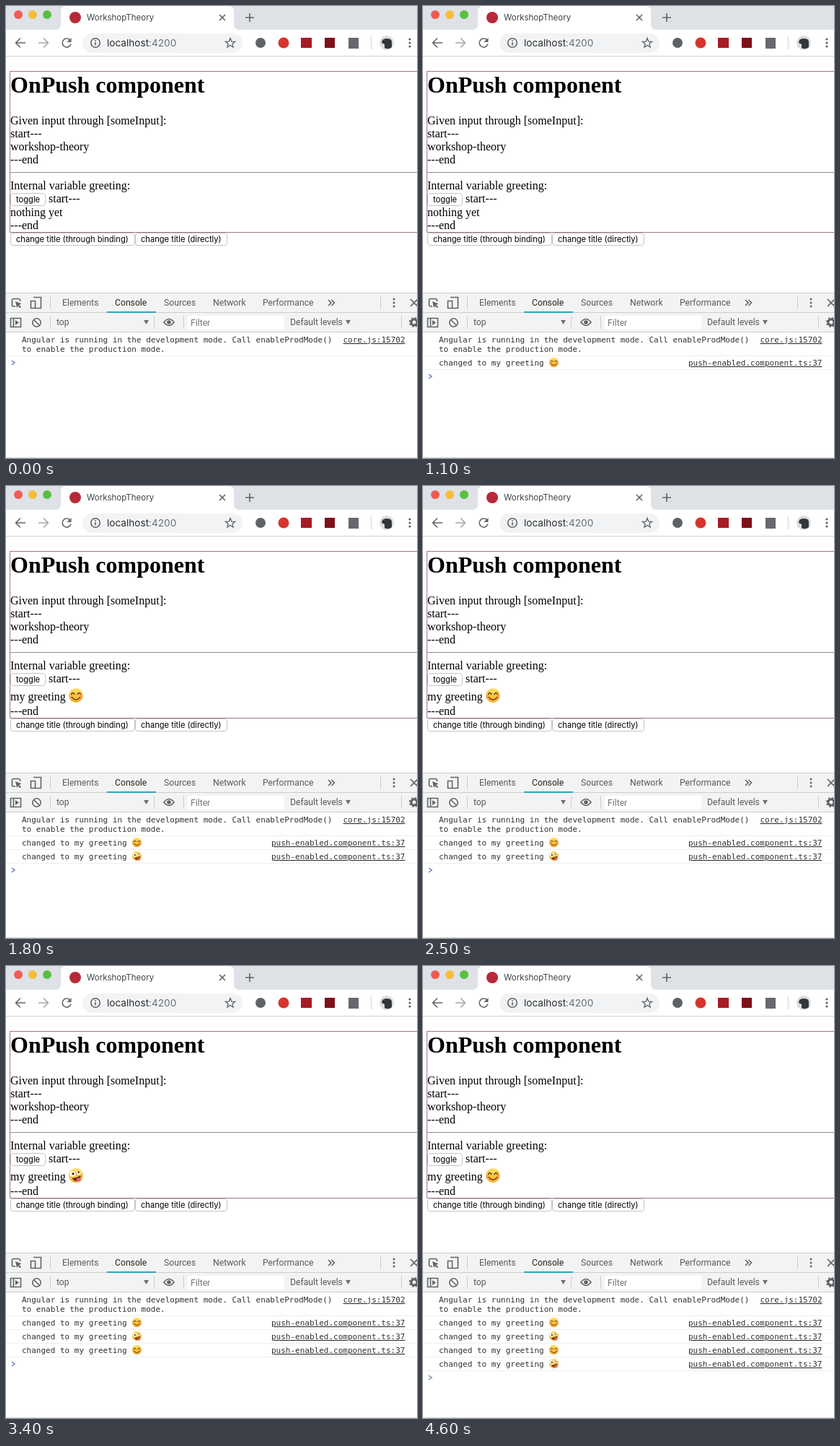
These frames come from a looping animation (570 px wide and 626 px high, 4800 ms). An HTML page:

```html
<!DOCTYPE html>
<html lang="en">
<head>
<meta charset="utf-8">
<title>OnPush component</title>
<style>
  html, body { margin: 0; width: 100%; height: 100%; overflow: hidden; background: #fff; }
  svg { display: block; width: 570px; height: 626px; }
  text { white-space: pre; }
  .page { font: 16px "Liberation Serif", serif; fill: #000; }
  .title { font: bold 32px "Liberation Serif", serif; }
  .chrome { font: 11.5px Inter, sans-serif; fill: #3c4043; }
  .url { font: 13.6px Inter, sans-serif; fill: #2b2d30; }
  .btn { font: 11.15px Inter, sans-serif; fill: #000; }
  .tool { font: 12.2px Roboto, sans-serif; fill: #5a5a5a; }
  .mono { font: 11px "DejaVu Sans Mono", monospace; fill: #303030; }
  .link { text-decoration: underline; }
  .line { fill: none; stroke: #5f6368; stroke-width: 1.6; }
  .rule { stroke: #ccc; }
</style>
</head>
<body>
<svg viewBox="0 0 570 626">
  <defs>
    <linearGradient id="pressed" x2="0" y2="1">
      <stop offset="0" stop-color="#6aa3f4"/><stop offset="1" stop-color="#2a62dc"/>
    </linearGradient>
    <linearGradient id="skin" x2="0" y2="1">
      <stop offset="0" stop-color="#ffe168"/><stop offset="1" stop-color="#f3ab2c"/>
    </linearGradient>
    <g id="smile">
      <circle r="10" fill="url(#skin)"/>
      <circle cx="-6.5" cy="2" r="2.4" fill="#f28a45" opacity=".6"/>
      <circle cx="6.5" cy="2" r="2.4" fill="#f28a45" opacity=".6"/>
      <path d="M-6.5-1.5q2.2-4 4.4 0M2.1-1.5q2.2-4 4.4 0M-5.5 3q5.500 6 11 0" fill="none" stroke="#6b3d12" stroke-width="1.5" stroke-linecap="round"/>
    </g>
    <g id="zany" transform="rotate(-12)">
      <circle r="10" fill="url(#skin)"/>
      <circle cx="-4" cy="-3" r="3.700" fill="#fff"/><circle cx="-3.500" cy="-3" r="1.700" fill="#4b2d16"/>
      <circle cx="4.500" cy="-3" r="2.700" fill="#fff"/><circle cx="4.500" cy="-3.500" r="1.400" fill="#4b2d16"/>
      <path d="M-6 2.500Q0 4 6.500 1.500Q5 8.500 0 8Q-4.500 7.500-6 2.500Z" fill="#5b2d14"/>
      <path d="M-1 5.500Q3 2.500 5 5Q6.500 9 3 9.500Q0 9.500-1 5.500Z" fill="#ee5f74"/>
    </g>
  </defs>
  <rect width="570" height="626" fill="#fff"/>

  <!-- browser window -->
  <rect width="570" height="33" fill="#dee1e6"/>
  <path d="M68 33Q76 33 76 25V8Q76 0 84 0H308Q316 0 316 8V25Q316 33 324 33Z" fill="#fff"/>
  <circle cx="17" cy="12" r="6" fill="#ee5c54"/>
  <circle cx="37" cy="12" r="6" fill="#f6bd3b"/>
  <circle cx="57" cy="12" r="6" fill="#58c041"/>
  <circle cx="96" cy="16" r="8" fill="#b52a38"/>
  <text class="chrome" x="112" y="20">WorkshopTheory</text>
  <g class="line">
    <path d="M296 12l8 8m0-8l-8 8M332 16h12m-6-6v12"/>
    <path d="M27 51H14m6-6.500l-6.500 6.500 6.500 6.500"/>
    <path d="M45 51H58m-6-6.500l6.500 6.500-6.500 6.500" stroke="#a5a8ac"/>
    <path d="M89 47.500A6 6 0 1 0 90 52.500"/>
  </g>
  <path d="M90.500 44v6h-6z" fill="#5f6368"/>
  <rect x="106" y="38" width="222" height="27" rx="13.500" fill="#f1f3f4"/>
  <g class="line" stroke-width="1.400">
    <circle cx="124" cy="51" r="6.300"/>
    <path d="M124 50v4.500M124 47v1.700"/>
    <path id="star" stroke-width="1.300"/>
  </g>
  <text class="url" x="140" y="56">localhost<tspan fill="#6b6f74">:4200</tspan></text>
  <circle cx="353" cy="51" r="7" fill="#5f6368"/>
  <circle cx="385" cy="51" r="7.500" fill="#d8342f"/>
  <rect x="409" y="44" width="15" height="14" fill="#a51c24"/>
  <rect x="442" y="44" width="14" height="14" fill="#800f18"/>
  <rect x="475" y="44" width="14" height="15" fill="#65686c"/>
  <path d="M506.500 42v18" stroke="#d0d3d7"/>
  <circle cx="528" cy="51" r="10" fill="#d9dce0"/>
  <path d="M521 51Q521 45 528 45Q536 45 535 51L535 57Q530 61 525 58V53Z" fill="#34373a"/>
  <g fill="#5f6368">
    <circle cx="560" cy="46" r="1.600"/><circle cx="560" cy="51" r="1.600"/><circle cx="560" cy="56" r="1.600"/>
  </g>
  <path d="M0 69.500H570" stroke="#cfd1d4"/>

  <!-- page -->
  <g class="page">
    <text class="title" x="6" y="120">OnPush component</text>
    <text x="6" y="164">Given input through [someInput]:</text>
    <text x="6" y="182">start---</text>
    <text x="6" y="200">workshop-theory</text>
    <text x="6" y="218">---end</text>
    <path d="M6 230.500H570" stroke="#909090"/>
    <text x="6" y="254">Internal variable greeting:</text>
    <text x="59" y="272">start---</text>
    <text id="greeting" x="6"></text>
    <text id="end" x="6">---end</text>
  </g>
  <use id="face"/>
  <path id="frame" fill="none" stroke="#a3728a"/>
  <rect id="toggle" x="6.500" y="259.500" width="48" height="17" rx="3.500"/>
  <text class="btn" x="14" y="272">toggle</text>
  <g id="buttons">
    <g fill="#fff" stroke="#c4c4c4">
      <rect x="6.500" y="314.500" width="172" height="17" rx="3.500"/>
      <rect x="179.500" y="314.500" width="127" height="17" rx="3.500"/>
    </g>
    <text class="btn" x="14" y="327">change title (through binding)</text>
    <text class="btn" x="187" y="327">change title (directly)</text>
  </g>

  <!-- developer tools -->
  <rect y="397" width="570" height="55" fill="#f3f3f3"/>
  <path class="rule" d="M0 397.500H570M0 424.500H570M0 451.500H570M61.500 402v18M519.500 402v18M61.500 429v18M205.500 429v18M246.500 429v18M548.500 429v18"/>
  <path d="M140 424H208" stroke="#2fa5c0" stroke-width="2"/>
  <g class="tool">
    <text x="78" y="415">Elements</text>
    <text x="151" y="415" fill="#222">Console</text>
    <text x="219" y="415">Sources</text>
    <text x="287" y="415">Network</text>
    <text x="356" y="415">Performance</text>
    <text x="70" y="442">top</text>
    <rect x="252" y="429" width="134" height="19" fill="#fff"/>
    <text x="256" y="443" fill="#757575">Filter</text>
    <text x="394" y="442">Default levels</text>
    <path d="M191 435h7l-3.500 6zM471 435h7l-3.500 6z" fill="#6e6e6e"/>
  </g>
  <g class="line" stroke-width="1.400">
    <path d="M13 416H10.500Q8.500 416 8.500 414V407.500Q8.500 405.500 10.500 405.500H17.500Q19.500 405.500 19.500 407.500V409"/>
    <path d="M38 403.500H48.500V418.500H41M34.500 408.500H40.500V418.500H34.500Z"/>
    <path d="M447 407l4 4-4 4m4.500-8l4 4-4 4M561 406l10 10m0-10l-10 10"/>
    <path d="M6.500 432.500H20.500V444.500H6.500ZM10.500 432V445"/>
    <circle cx="42.500" cy="438.500" r="5.700"/><path d="M38.500 434.500l8 8"/>
    <path d="M219 438Q226 429 233 438Q226 447 219 438Z"/>
    <circle cx="566" cy="438" r="4" stroke-width="3"/>
    <circle cx="566" cy="438" r="6" stroke-width="2" stroke-dasharray="2.500 2.210"/>
  </g>
  <path d="M13 409l8.500 3.500-3.500 1.300 3 3-1.500 1.500-3-3-1.300 3.200zM13 435l5 3.500-5 3.500z" fill="#5f6368"/>
  <circle cx="226" cy="438" r="2.800" fill="#5f6368"/>
  <g fill="#5f6368">
    <circle cx="538" cy="406" r="1.500"/><circle cx="538" cy="411" r="1.500"/><circle cx="538" cy="416" r="1.500"/>
  </g>
  <g class="mono">
    <text x="22" y="466">Angular is running in the development mode. Call enableProdMode()</text>
    <text x="22" y="479">to enable the production mode.</text>
    <text class="link" x="467.500" y="466">core.js:15702</text>
    <path d="M0 484.500H570" stroke="#eee"/>
    <g id="log"></g>
  </g>
  <path id="prompt" d="M8 491l4 3-4 3" fill="none" stroke-width="1.500"/>
  <path d="M0 625.500H570" stroke="#d5d5d5"/>
</svg>
<script>
const LOOP = 4800;
const ROW = 19;
const FACES = ['smile', 'zany'];
// Each press of the toggle: [down, up] in ms; the release logs a line.
const CLICKS = [[500, 700], [1600, 1800], [2600, 2800], [3500, 3700]];
const el = id => document.getElementById(id);
const set = (id, attrs) => {
  for (const name in attrs) el(id).setAttribute(name, attrs[name]);
};
const faceAt = (x, y, scale) => `translate(${x} ${y}) scale(${scale})`;

const starPoints = Array.from({ length: 10 }, (_, i) => {
  const angle = -Math.PI / 2 + i * Math.PI / 5;
  const radius = i % 2 ? 3 : 7;
  return `${311 + radius * Math.cos(angle)} ${51.5 + radius * Math.sin(angle)}`;
});
set('star', { d: `M${starPoints.join('L')}Z` });

el('log').innerHTML = CLICKS.map((_, i) => `
  <g transform="translate(0 ${i * ROW})">
    <text x="22" y="498">changed to my greeting</text>
    <use href="#${FACES[i % 2]}" transform="${faceAt(181.5, 493.5, 0.67)}"/>
    <text class="link" x="368" y="498">push-enabled.component.ts:37</text>
    <path d="M0 503.5H570" stroke="#eee"/>
  </g>`).join('');

function draw(time) {
  const pressed = CLICKS.some(([down, up]) => time >= down && time < up);
  const count = CLICKS.filter(([, up]) => time >= up).length;
  // The view shows the value set by the previous click.
  const greeted = count > 1;
  const shift = greeted ? 8 : 0;

  el('greeting').textContent = greeted ? 'my greeting' : 'nothing yet';
  set('greeting', { y: greeted ? 297 : 291 });
  set('end', { y: 309 + shift });
  set('face', {
    href: '#' + FACES[count % 2],
    transform: faceAt(97, 290, 1),
    visibility: greeted ? 'visible' : 'hidden'
  });
  set('frame', { d: `M571 90.5H5.5V${313.5 + shift}H571` });
  set('buttons', { transform: `translate(0 ${shift})` });
  set('toggle', {
    fill: pressed ? 'url(#pressed)' : '#fff',
    stroke: pressed ? '#2e62c8' : '#c4c4c4'
  });
  [...el('log').children].forEach((row, i) => {
    row.setAttribute('visibility', i < count ? 'visible' : 'hidden');
  });
  set('prompt', {
    transform: `translate(0 ${count * ROW})`,
    stroke: count === CLICKS.length ? '#8189a0' : '#6680bd'
  });
}

const start = performance.now();
function tick() {
  draw((performance.now() - start) % LOOP);
  requestAnimationFrame(tick);
}
tick();
</script>
</body>
</html>
```
